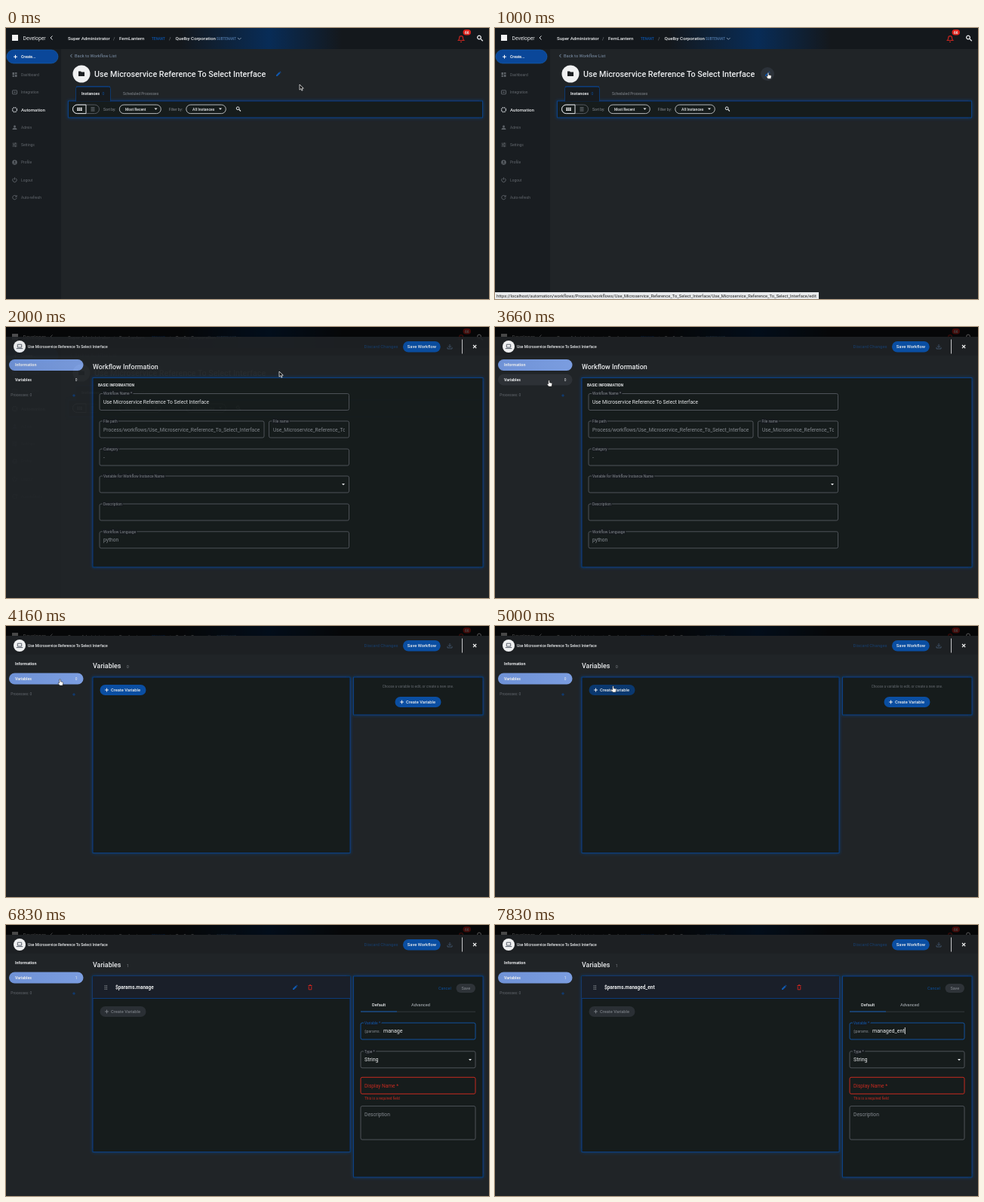
These frames come from a looping animation (640 px wide and 360 px high, 8000 ms). An HTML page:

```html
<!DOCTYPE html>
<html lang="en">
<head>
<meta charset="utf-8">
<title>Workflow editor</title>
<style>
html, body { margin: 0; width: 100%; height: 100%; overflow: hidden; background: #202427; }
svg { display: block; width: 100vw; height: 100vh; }
text { font-family: Roboto, Arial, sans-serif; fill: #e9ebed; white-space: pre; }
.m { font-weight: 500; }
.b { font-weight: 700; }
.mid { text-anchor: middle; }
.dim { fill: #62676d; }
.gray { fill: #858a90; }
.blue { fill: #0c4c98; }
.red { fill: #c52a20; }
.line { fill: none; stroke: #dfe2e5; }
.label { paint-order: stroke; stroke: #171b1f; stroke-width: 3; }
.panel { fill: #171b1f; stroke: #0a3f83; filter: url(#glow); }
</style>
</head>
<body>
<svg id="stage" viewBox="0 0 640 360"></svg>
<script>
const text = (x, y, size, str, cls = '', extra = '') =>
  `<text x="${x}" y="${y}" font-size="${size}" class="${cls}" ${extra}>${str}</text>`;
const rect = (x, y, w, h, fill, r = 0, extra = '') =>
  `<rect x="${x}" y="${y}" width="${w}" height="${h}" rx="${r}" fill="${fill}" ${extra}/>`;
const circle = (x, y, r, fill, extra = '') => `<circle cx="${x}" cy="${y}" r="${r}" fill="${fill}" ${extra}/>`;
const line = (d, color = '#dfe2e5', width = 1, extra = '') =>
  `<path d="${d}" fill="none" stroke="${color}" stroke-width="${width}" ${extra}/>`;
const panel = (x, y, w, h) => `<rect class="panel" x="${x}" y="${y}" width="${w}" height="${h}"/>`;
const plus = (x, y, color = '#fff', r = 2.4) => line(`M${x - r} ${y}h${2 * r}M${x} ${y - r}v${2 * r}`, color, 1);
const group = (id, body, extra = '') => `<g id="${id}" ${extra}>${body}</g>`;
const drop = (x, y) => `<path d="M${x - 2} ${y - 1}h4l-2 2.2z" fill="#e9ebed"/>`;
const search = (x, y, s) => `<g transform="translate(${x} ${y}) scale(${s})">
  ${circle(-.8, -.8, 1.9, 'none', 'stroke="#e9ebed"')}${line('M.7 .7L3 3', '#e9ebed', 1.1)}</g>`;
const pencil = (x, y, color) =>
  `<path transform="translate(${x} ${y})" d="M-3 3v-1.6L1-2.6 2.6-1-1.4 3zM1.5-3.1l.6-.5L3.6-2.1l-.5.6z" fill="${color}"/>`;

function field(x, y, w, label, value = '', cls = '', h = 22, stroke = '#555a60') {
  return rect(x, y, w, h, 'none', 2, `stroke="${stroke}" stroke-width=".9"`) +
    text(x + 5, y + 1.8, 4.9, label, 'label gray') + text(x + 5, y + 13.6, 6.7, value, cls);
}

const title = 'Use Microservice Reference To Select Interface';
const slug = title.replaceAll(' ', '_');

function sidebar() {
  const c = '#5d6268';
  const names = ['Dashboard', 'Integration', 'Automation', 'Admin', 'Settings', 'Profile', 'Logout', 'Auto-refresh'];
  const icons = [
    rect(-3, -3, 2.6, 3.4, c) + rect(.4, -3, 2.6, 2, c) + rect(-3, 1.2, 2.6, 1.8, c) + rect(.4, -.2, 2.6, 3.2, c),
    rect(-3, -2.5, 6, 5, 'none', .5, `stroke="${c}"`) + line('M-1.5 0h3', c),
    circle(0, 0, 3, 'none', 'stroke="#c8ccd0" stroke-width="1.3" stroke-dasharray="1.6 .75"'),
    circle(0, -1.2, 1.5, c) + `<path d="M-3 3q0-2.5 3-2.5t3 2.5z" fill="${c}"/>`,
    line('M-3-2h6M-3 0h6M-3 2h6M1-3v2M-1-1v2M1 1v2', c, .8),
    circle(0, 0, 3.2, c) + circle(0, -.8, 1.1, '#191d21') + line('M-1.8 1.8q1.8-1.4 3.6 0', '#191d21', .8),
    line('M-1.6-2a2.7 2.7 0 1 0 3.2 0M0-3.2v3', c),
    line('M2.2-1.5a2.7 2.7 0 1 0 .4 2M2.7-3v2h-2', c)
  ];
  return names.map((name, i) => {
    const y = 62 + i * 23.3;
    return `<g transform="translate(11.5 ${y})">${icons[i]}</g>` +
      (i === 2 ? text(20, y + 2.1, 6.1, name, 'm') : text(20, y + 1.8, 4.9, name, 'dim'));
  }).join('');
}

const page = rect(0, 0, 640, 360, '#202427') + rect(0, 28, 73, 332, '#191d21') +
  rect(0, 0, 640, 28, '#14181c') + rect(230, 0, 215, 28, 'url(#sky)') +
  rect(8, 9, 8, 8, '#f2f3f4') + text(22.5, 15.5, 6.8, 'Developer') + line('M61.5 10.5l-2.5 2.5 2.5 2.5') +
  text(82, 16.3, 6.2, 'Super Administrator', 'm') + text(142, 16.3, 6, '/', 'gray') +
  text(150, 16.3, 6.2, 'FernLantern', 'm') + text(193, 15.7, 4.6, 'TENANT', 'b blue') + text(216, 16.3, 6, '/', 'gray') +
  text(224.5, 16.3, 6.2, 'Quelby Corporation', 'm') + text(279, 15.7, 4.5, 'SUBTENANT', 'b', 'style="fill:#456b98"') +
  line('M307 13l2.3 2.3 2.3-2.3', '#8da0b5', .9) +
  line('M599.5 16.5q1.2-1 1.2-3.5a2.4 2.4 0 0 1 4.8 0q0 2.5 1.2 3.5zM602 18.5h2', '#c5251f', 1.2) +
  rect(605.5, 2, 10.5, 7.6, '#e0221c', 3.8) + text(610.7, 7.6, 4.8, '66', 'b mid') + search(628, 13.5, 1.25) +
  rect(1, 29, 68, 18, '#0a4799', 9, 'stroke="#1763b8" stroke-width=".6"') + plus(12.5, 38.2) +
  text(20, 40, 5.1, 'Create...', 'b') + sidebar() +
  line('M87.5 34.8l-2 2.2 2 2.2', '#7f93ab', .9) + text(91, 39, 5.75, 'Back to Workflow List', '', 'style="fill:#7f93ab"') +
  circle(100, 61, 11.5, '#f0f1f2') + '<path d="M96 57.5h3l1 1h4v5.5h-8z" fill="#1b1e21"/>' +
  text(117, 64.8, 10.75, title, 'm') +
  panel(82.5, 97, 549, 22) +
  '<path d="M92.5 97.6v-17q0-3 3-3h40q3 0 3 3v17" fill="#171b1f" stroke="#0b3f80" stroke-width=".8"/>' +
  line('M93 78h45', '#0b4a9c', .8) +
  text(100, 89.4, 5.5, 'Instances', 'b') + text(127.5, 89.4, 5.2, '0', 'blue') +
  text(155, 89.3, 4.95, 'Scheduled Processes', 'gray') +
  rect(88.5, 102, 35, 11.6, 'none', 5.8, 'stroke="#565b61"') +
  line('M106 102H94.3a5.8 5.8 0 0 0 0 11.6H106z') +
  [0, 1, 2, 3, 4, 5].map(i => rect(94.3 + i % 3 * 2.3, 105.7 + (i > 2) * 2.4, 1.8, 1.9, '#f2f3f4')).join('') +
  line('M112.5 105.8h5M112.5 107.9h5M112.5 110h5', '#70757b', 1) +
  text(129, 109.5, 4.9, 'Sort by:', 'gray') + text(158, 109.6, 4.85, 'Most Recent', 'm') +
  rect(150.3, 102, 55, 11.6, 'none', 5.8, 'stroke="#c5c8cb" stroke-width=".9"') + drop(198.5, 107.5) +
  text(215.7, 109.5, 4.9, 'Filter by:', 'gray') + text(247, 109.6, 5.1, 'All Instances', 'm') +
  rect(238.8, 102, 52.5, 11.6, 'none', 5.8, 'stroke="#c5c8cb" stroke-width=".9"') + drop(284, 107.5) +
  search(308, 107.5, 1) +
  group('pencilHover', circle(361, 61, 9, '#2c3239')) + pencil(361, 61, '#1158ad') +
  group('status', rect(0, 351, 429, 9, '#e8eaec') + text(2, 357.8, 5.75,
    `https://localhost/automation/workflows/Process/workflows/${slug}/${slug}/edit`, '', 'style="fill:#222"'));

const info = text(115, 56, 8.95, 'Workflow Information', 'm') + panel(115, 67.5, 517, 251.5) +
  text(122, 79.3, 4.9, 'BASIC INFORMATION', 'b') +
  field(124, 88.5, 330.5, 'Workflow Name *', title) +
  field(124, 125, 218, 'File path') + field(348.5, 125, 106, 'File name') +
  `<svg x="129" y="125" width="208.5" height="22">${text(0, 13.6, 6.7, 'Process/workflows/' + slug, 'gray')}</svg>` +
  `<svg x="354" y="125" width="95" height="22">${text(0, 13.6, 6.7, slug, 'gray')}</svg>` +
  field(124, 162, 330.5, 'Category', '-', 'gray') +
  field(124, 198, 330.5, 'Variable for Workflow Instance Name') + drop(447, 209) +
  field(124, 235, 330.5, 'Description') + field(124, 271.8, 330.5, 'Workflow Language', 'python', 'gray');

const createButton = (id, x, y, w, fill, color = '#e9ebed') => rect(x, y, w, 14, fill, 7, `id="${id}"`) +
  plus(x + 9, y + 7, color) + text(x + 14.5, y + 9.1, 5.7, 'Create Variable', 'm', `style="fill:${color}"`);

const empty = createButton('create', 124.5, 78, 61, '#0a4ea2') + panel(460.5, 68, 171.5, 50) +
  text(546, 82.2, 4.65, 'Choose a variable to edit, or create a new one.', 'mid dim') +
  createButton('createSide', 515.5, 94, 61, '#0a4ea2');

const form = rect(115, 68, 341, 30, '#1a1f29') + line('M115 97.5h341', '#0b3f83', .9) +
  [0, 1, 2, 3, 4, 5].map(i => circle(131.2 + i % 2 * 2.2, 80.8 + (i >> 1) * 2.2, .7, '#8a8f95')).join('') +
  text(145, 85.2, 6.48, '', 'b', 'id="rowName"') + pencil(383, 83, '#1158ad') +
  line('M400.5 80.5h5M402 79.7h2M401.2 81.5v4.3h3.6v-4.3', '#c5251f', 1) +
  createButton('createOff', 124.5, 108, 61, '#2a2f34', '#757a80') +
  panel(460.5, 68, 171.5, 267) + text(573, 85.7, 5.5, 'Cancel', 'blue') +
  rect(596.5, 78, 25.5, 12, '#2e3338', 6) + text(609.3, 85.9, 5.5, 'Save', 'mid gray') +
  text(485, 107.5, 5.6, 'Default', 'm') + text(537, 107.5, 5.6, 'Advanced', 'm', 'style="fill:#9ba0a5"') +
  line('M470 115.2h152', '#3a3f45', .8) + line('M470 115h48', '#1158ad', 1.2) +
  group('nameField', field(470, 130, 152, 'Variable *', '', '', 22, 'currentColor')) +
  text(475, 143, 5, '$params.', 'gray') + text(500, 143.2, 7.1, '', '', 'id="value"') + rect(0, 136, .8, 9, '#fff', 0, 'id="caret"') +
  field(470, 167.8, 152, 'Type *') + text(475, 181.3, 7.1, 'String') + drop(615, 179) +
  rect(470, 202.3, 152, 22, 'none', 2, 'stroke="#c52a20"') + text(475, 215.6, 6.6, 'Display Name *', 'red') +
  text(475, 231.6, 4.8, 'This is a required field', 'red') +
  rect(470, 240.6, 152, 44.5, 'none', 2, 'stroke="#555a60" stroke-width=".9"') + text(475, 254.2, 6.7, 'Description', 'gray');

const variables = text(115, 56, 8.95, 'Variables', 'm') + text(160, 56, 4.8, '0', 'gray', 'id="countHead"') +
  panel(115, 68, 341, 233.5) + group('empty', empty) + group('form', form);

const modal = rect(0, 0, 640, 360, '#000', 0, 'opacity=".7"') + rect(0, 13, 640, 347, '#202427') +
  rect(0, 13, 640, 25, '#1d2023') +
  circle(18, 26, 8, '#f0f1f2') + line('M15.3 23.2h5.4v3.8h-5.4zM13.7 28.6h8.6', '#59616c', 1) +
  text(29, 28, 5, title, 'm') + text(474.5, 28.4, 6, 'Discard Changes', '', 'style="fill:#173f70"') +
  rect(526, 19, 49.7, 14.5, '#0a4ea2', 7.2) + text(550.9, 28.4, 5.75, 'Save Workflow', 'm mid') +
  line('M588 23v4M586 25.3l2 2 2-2M585 27v2h6v-2', '#41566f', .9) + line('M604.5 16.5v19', '#d8dadc', .9) +
  line('M619 24l4.2 4.2M623.2 24l-4.2 4.2', '#fff', 1.1) +
  rect(4, 62.5, 98.5, 15, '#2d3136', 7.5, 'id="hover"') + rect(4, 43, 98.5, 15, 'url(#pill)', 7.5, 'id="pillBox"') +
  text(12, 52.3, 5.4, 'Information', 'b') + text(12, 71.8, 5.2, 'Variables', 'b') + text(91.8, 71.8, 4.8, '0', '', 'id="countSide"') +
  text(6.3, 92.4, 4.9, 'Processes: 0', 'dim') + plus(90, 91, '#0c4184', 1.8) +
  group('info', info) + group('variables', variables);

const stage = document.getElementById('stage');
stage.innerHTML = `<defs>
  <filter id="glow" filterUnits="userSpaceOnUse" x="0" y="0" width="640" height="360">
    <feDropShadow dx="0" dy="0" stdDeviation="2" flood-color="#0a4ea2" flood-opacity=".65"/></filter>
  <linearGradient id="sky"><stop stop-color="#082c57" stop-opacity="0"/><stop offset=".55" stop-color="#082c57"/>
    <stop offset="1" stop-color="#082c57" stop-opacity="0"/></linearGradient>
  <linearGradient id="pill"><stop stop-color="#6f92d6"/><stop offset="1" stop-color="#7b9de0"/></linearGradient>
</defs>` + group('page', page) + group('modal', modal) +
  group('arrow', '<path d="M0 0v7.2l1.7-1.6 1.2 2.6 1.2-.5-1.2-2.6h2.4z" fill="#111" stroke="#fff" stroke-width=".7"/>') +
  group('hand', '<path d="M-.8 0q.8-.7 1.6 0v2.8l3 .8q.6.3.4 1L3.6 8H-.3L-2.6 5q.1-1 1.8-.3z" fill="#fff" stroke="#111" stroke-width=".5"/>');

const el = id => document.getElementById(id);
const show = (id, on) => el(id).style.display = on ? '' : 'none';
const at = (list, t) => list.findLast(step => step[0] <= t);

// Each step holds until the next one: time, then values.
const pointer = [
  [0, 389, 75, 'arrow'], [330, 387, 74, 'arrow'], [500, 380, 70, 'arrow'], [660, 370, 64, 'arrow'],
  [830, 363, 61, 'hand'], [1000, 362, 59.5, 'hand'], [1830, 362, 59, 'arrow'],
  [3000, 346, 60, 'arrow'], [3160, 260, 65, 'arrow'], [3330, 150, 70, 'arrow'], [3500, 86, 72, 'hand'], [3660, 71.5, 71, 'hand'],
  [4330, 75, 71.5, 'hand'], [4500, 95, 74, 'hand'], [4660, 128, 79, 'arrow'], [4830, 150, 81, 'hand'], [5000, 156.5, 80, 'hand'],
  [5330, 0, 0, '']
];
const typing = [[0, ''], [5830, 'm'], [6000, 'ma'], [6160, 'mana'], [6330, 'manag'], [6500, 'manage'],
  [7160, 'managed'], [7330, 'managed_'], [7500, 'managed_e'], [7660, 'managed_en'], [7830, 'managed_ent']];
const fade = [[0, 0], [1830, .5], [2000, .97], [2160, 1]];
const focus = [[0, '#c52a20'], [5830, '#85304a'], [6000, '#1158ad']];

function draw(t) {
  const [, x, y, kind] = at(pointer, t);
  for (const id of ['arrow', 'hand']) {
    show(id, id === kind);
    el(id).setAttribute('transform', `translate(${x} ${y})`);
  }
  const onPencil = t >= 830 && t < 1830;
  show('pencilHover', onPencil);
  show('status', onPencil);

  el('modal').style.opacity = at(fade, t)[1];
  const onVariables = t >= 4160, editing = t >= 5330;
  show('hover', t >= 3500 && !onVariables);
  el('pillBox').setAttribute('y', onVariables ? 62.5 : 43);
  show('info', !onVariables);
  show('variables', onVariables);
  show('empty', !editing);
  show('form', editing);
  el('create').setAttribute('fill', t >= 4830 ? '#0a386f' : '#0a4ea2');
  el('countHead').textContent = el('countSide').textContent = editing ? 1 : 0;

  const word = at(typing, t)[1], color = at(focus, t)[1];
  el('rowName').textContent = '$params.' + word;
  el('value').textContent = word;
  el('nameField').style.color = color;
  el('nameField').querySelector('.label').style.fill = color;
  el('caret').setAttribute('x', 500 + (editing ? el('value').getComputedTextLength() : 0));
  show('caret', t < 6830 || t >= 7160);
}

function tick(now) {
  draw(now % 8000);
  requestAnimationFrame(tick);
}
draw(0);
requestAnimationFrame(tick);
</script>
</body>
</html>
```
